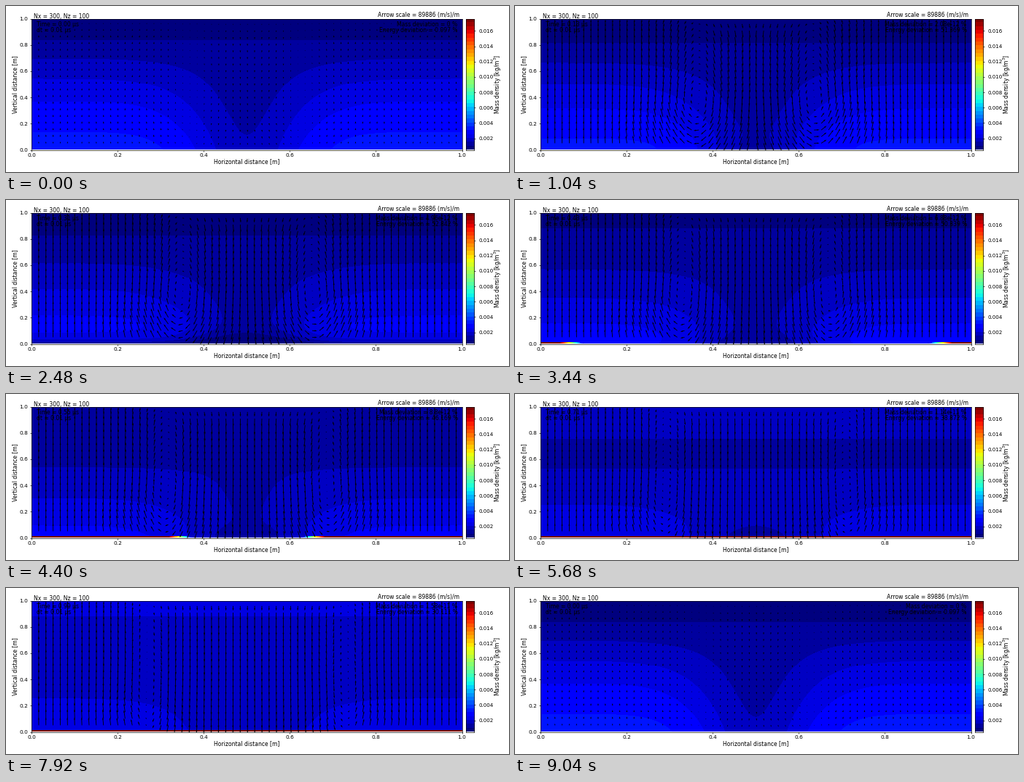
These frames come from a looping animation (690x229 px, 9120 ms). A matplotlib script:

```python
import numpy as np
import matplotlib.pyplot as plt
from matplotlib.animation import FuncAnimation

W, H, DPI = 690, 229, 80
STEP, FRAMES = 80, 114
BANDS, LOW, HIGH = 34, 0.0005, 0.0176
L, R, T, B = 35, 625.5, 17.5, 198.5

plt.rcParams.update({
    "font.family": "DejaVu Sans", "font.size": 6.85,
    "xtick.labelsize": 6.7, "ytick.labelsize": 6.7,
    "axes.linewidth": 0.6, "xtick.major.width": 0.6, "ytick.major.width": 0.6,
    "xtick.major.size": 2, "ytick.major.size": 2,
    "xtick.major.pad": 2.2, "ytick.major.pad": 2.2,
})


def mixing(t):
    """Slow progress from the first stratified state to the mixed one."""
    s = min(t / 8000, 1)
    return s * s * (3 - 2 * s)


def onset(t):
    """Quick start of the flow."""
    return 1 - np.exp(-(t / 600) ** 2)


nx, nz = 591, 182
gx = ((np.arange(nx) + .5) / nx)[None, :]
gz = (1 - (np.arange(nz) + .5) / nz)[:, None]
dist = np.abs(gx - .5)


def density(t):
    """Colour value of the density band at each pixel."""
    m = mixing(t)
    dip = .6 * np.sqrt(max(np.sin(np.pi * m), 0))

    start = 5.3 - 5.6 * gz ** 1.45
    end = 2.2 + 2.6 * np.abs(gz - .565)
    side = (1 - m) * start + m * end - dip * np.minimum(gz / .35, 1)

    mid = 2.15 + .3 * m + gz * (2.1 * m - 1.35)
    mid = mid - dip * (.6 + np.exp(-(gz / .08) ** 2))

    sigma = .09 + .06 * gz + .03 * m
    hole = np.maximum(side - mid, 0) * (1 - gz ** 4)
    k = side - hole * np.exp(-(dist / sigma) ** 2 / 2)

    # The floor empties for a while, then a dense layer closes in from the sides
    k = k - 3.5 * np.exp(-gz / .05 - ((t - 2400) / 700) ** 2)
    front = -.05 + .4 * (t - 3000) / 1400
    heap = np.clip((front - .5 + dist) / .06 + .5, 0, 1)
    k = np.where(gz < .009 * np.minimum(heap * 4, 1), BANDS * heap, k)
    return np.clip(np.floor(k), 0, BANDS) / BANDS


qx, qz = np.meshgrid(np.arange(5, 300, 5) / 299, np.arange(5, 100, 5) / 99)
off = qx - .5


def velocity(t):
    """Arrow components in pixels: rising sides, sinking middle."""
    m, go = mixing(t), onset(t)
    ring = np.abs(off) - (.13 + .1 * m)
    env = np.minimum(1, qz / .06) * np.clip((1.04 - qz) / .16, 0, 1)
    w = (3 + 10 * go) * env * np.tanh(ring / .035)
    turn = 1 + 7 * go * (1 - .85 * m)
    u = turn * np.sign(off) * np.exp(-(ring / .09) ** 2 / 2)
    return u * np.clip((.4 - qz) / .25, -.35, 1), w


fig = plt.figure(figsize=(W / DPI, H / DPI), dpi=DPI, facecolor="white")


def axes_px(l, t, r, b):
    return fig.add_axes([l / W, 1 - b / H, (r - l) / W, (b - t) / H])


def label(x, y, s, **kw):
    kw = {"va": "baseline", **kw}
    return fig.text(x / W, 1 - y / H, s, **kw)


ax = axes_px(L, T, R, B)
img = ax.imshow(density(0), extent=(0, 1, 0, 1), aspect="auto", cmap="jet",
                vmin=0, vmax=1, interpolation="nearest")
arrows = ax.quiver(qx, qz, *velocity(0), angles="uv", scale_units="dots",
                   scale=1, units="dots", width=.85, headwidth=2.4,
                   headlength=4, headaxislength=3.6, color="black")
ax.set(xlim=(0, 1), ylim=(0, 1))
ax.set_xticks(np.arange(6) / 5)
ax.set_yticks(np.arange(6) / 5)

bar = axes_px(630.5, T, 642, B)
bar.imshow((np.arange(BANDS) / (BANDS - 1))[:, None], origin="lower",
           extent=(0, 1, LOW, HIGH), aspect="auto", cmap="jet",
           vmin=0, vmax=1, interpolation="nearest")
bar.set_xticks([])
bar.yaxis.tick_right()
bar.set_yticks(np.arange(2, 17, 2) / 1000)
bar.tick_params(axis="y", pad=3.6, labelsize=6.4)
bar.yaxis.set_major_formatter("{x:.3f}")

middle = {"ha": "center", "va": "center"}
label(330, 215, "Horizontal distance [m]", **middle)
label(12.5, 108, "Vertical distance [m]", rotation=90, **middle)
label(674.5, 107.5, "Mass density [kg/m$^3$]", rotation=90, **middle)
label(38, 16.5, "Nx = 300, Nz = 100")
label(622.5, 15, "Arrow scale = 89886 (m/s)/m", ha="right")
time_txt = label(42, 28, "")
step_txt = label(42, 36, "dt = 0.01 µs")
mass_txt = label(619, 28, "", ha="right")
energy_txt = label(620, 36, "", ha="right")


def draw(i):
    n = i % (FRAMES - 1)
    t = n * STEP
    img.set_data(density(t))
    arrows.set_UVC(*velocity(t))
    energy = .097 + 54 * onset(t) - 24 * mixing(t) ** 2
    time_txt.set_text(f"Time = {n * .01:.2f} µs")
    mass_txt.set_text(f"Mass deviation = {n * 1.6e-13:.3g} %")
    energy_txt.set_text(f"Energy deviation = {energy:.3f} %")
    return img, arrows, time_txt, mass_txt, energy_txt


anim = FuncAnimation(fig, draw, frames=FRAMES, interval=STEP, repeat=True,
                     repeat_delay=0, blit=False)
plt.show()
```
